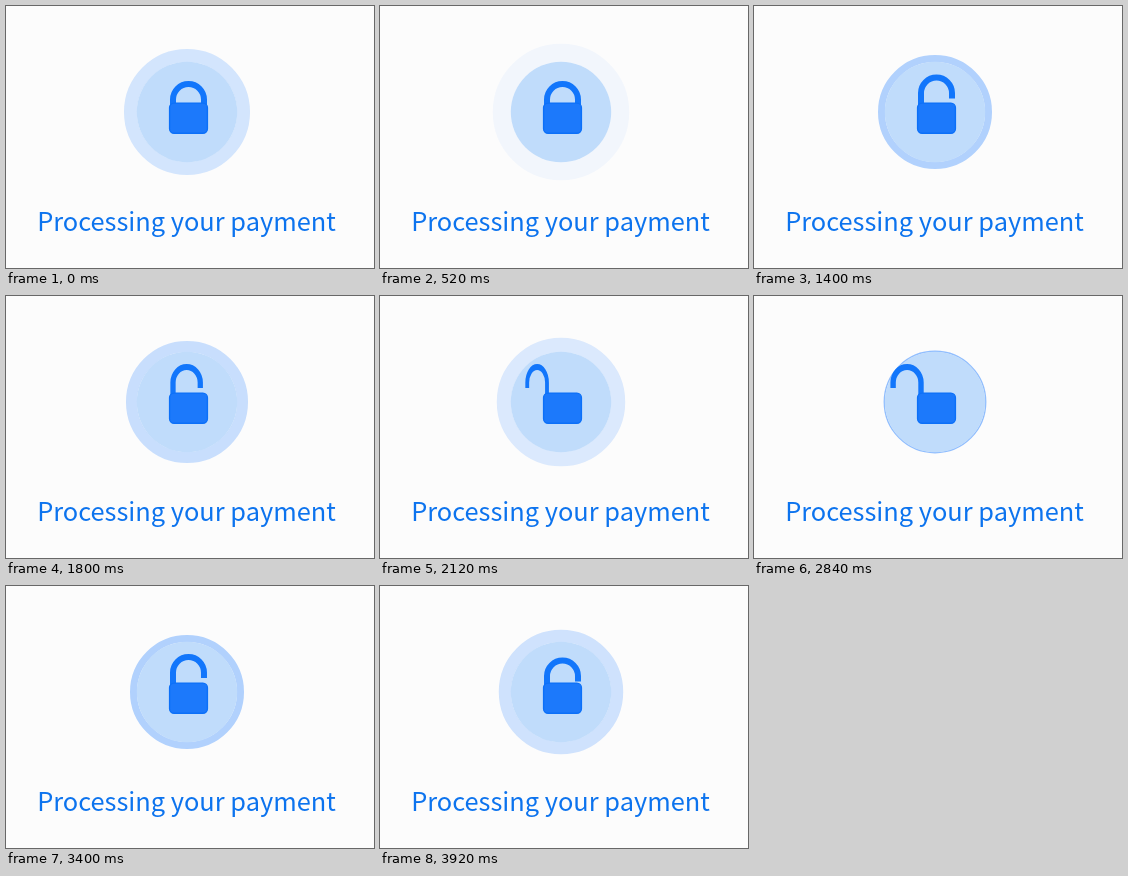
An HTML page that plays this animation: 368 px wide and 262 px high, repeating every 3.96 s.

```html
<!DOCTYPE html>
<html lang="en">
<head>
<meta charset="utf-8">
<title>Processing your payment</title>
<style>
  html, body { margin: 0; width: 100%; height: 100%; overflow: hidden; background: #fcfcfc; }
  svg { display: block; width: 368px; height: 262px; }
  text { font: 400 25.4px "Noto Sans CJK SC", "Noto Sans CJK JP", "Noto Sans", sans-serif; }
</style>
</head>
<body>
<svg viewBox="0 0 368 262">
  <rect width="368" height="262" fill="#fcfcfc"/>
  <circle id="ring" cx="181" cy="106" fill="none" stroke="#1677ff"/>
  <circle cx="181" cy="106" r="50.2" fill="#c0dcfb"/>
  <g id="shackle">
    <path d="M167 110V93.5a15.5 15.5 0 0 1 31 0V99" fill="none" stroke="#1276fb" stroke-width="6"/>
  </g>
  <rect x="163.6" y="97.1" width="37.8" height="30.2" rx="4.5" fill="#1c79fb" stroke="#0c70f8" stroke-width="1.4"/>
  <text x="180.5" y="225" text-anchor="middle" fill="#0c73ee">Processing your payment</text>
</svg>
<script>
const LOOP = 3960, PULSE = 2000, PULSE_START = 700;
const SPREAD = 20, RADIUS = 50, HINGE = 167, LIFT = 7;
const ring = document.getElementById("ring");
const shackle = document.getElementById("shackle");

// Eased 0..1 progress between two times
function ease(t, from, to) {
  const u = Math.min(1, Math.max(0, (t - from) / (to - from)));
  return u * u * (3 - 2 * u);
}

function draw(t) {
  const p = ((t - PULSE_START + PULSE) % PULSE) / PULSE;
  ring.setAttribute("r", RADIUS + SPREAD * p / 2);
  ring.setAttribute("stroke-width", SPREAD * p);
  ring.setAttribute("stroke-opacity", 0.5 * (1 - p));

  const lift = LIFT * (ease(t, 1220, 1440) - ease(t, 3840, 4000));
  const turn = Math.PI * (ease(t, 1600, 2400) - ease(t, 2650, 3450));
  shackle.setAttribute("transform",
    `translate(${HINGE} ${-lift}) scale(${Math.cos(turn)} 1) translate(${-HINGE} 0)`);
}

const start = performance.now();
function tick() {
  draw((performance.now() - start) % LOOP);
  requestAnimationFrame(tick);
}
draw(0);
requestAnimationFrame(tick);
</script>
</body>
</html>
```
